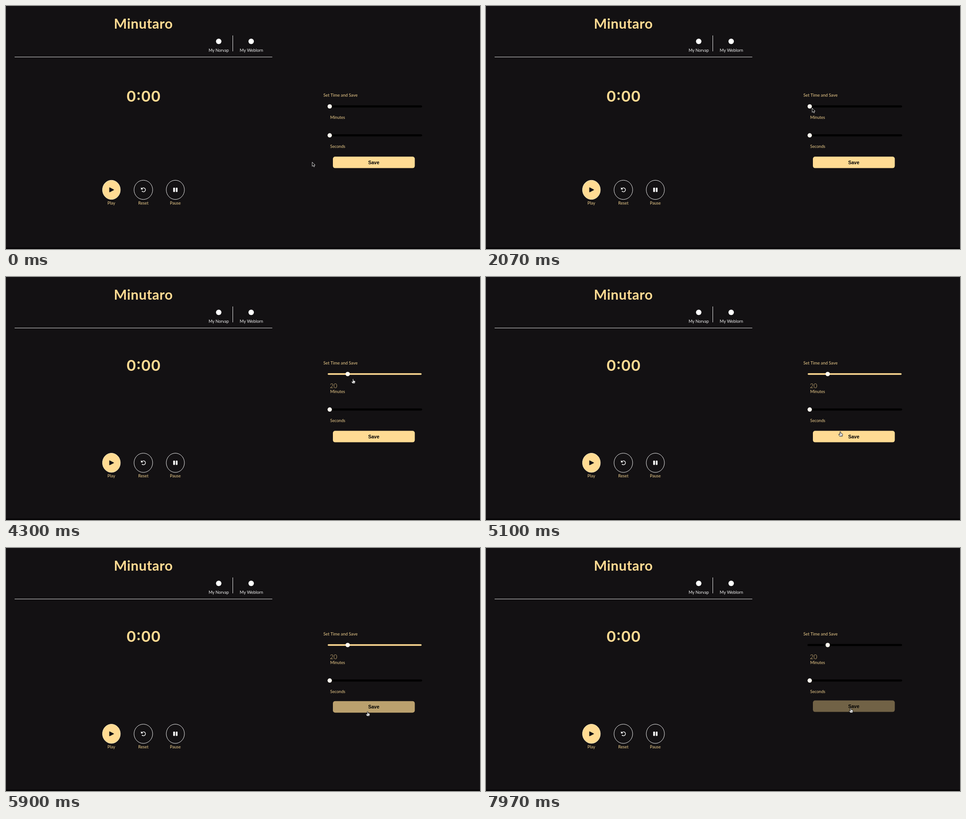
An HTML page with a canvas that plays this animation: 1044x536 px, repeating every 8000 ms.

```html
<!DOCTYPE html>
<html lang="en">
<head>
<meta charset="utf-8">
<title>Timer</title>
<style>
  html, body { margin: 0; width: 100%; height: 100%; overflow: hidden; background: #131113; }
  canvas { display: block; }
</style>
</head>
<body>
<canvas id="stage" width="1044" height="536"></canvas>
<script>
const ctx = document.getElementById('stage').getContext('2d');
const LOOP = 8000, BG = '#131113', GOLD = '#ffdb93', CREAM = '#fffaf0', LABEL = '#f0d08e';
const OPEN = 3430, BLUR = 7000;

// Each key is [time, ...values]; values ease from one key to the next.
const POINTER = [
  [1170, 674, 344], [1500, 748, 272], [1660, 756, 212], [1870, 717, 224],
  [2040, 717, 224], [2070, 718, 225], [2200, 716, 226], [2370, 716, 226],
  [2570, 714, 223], [2930, 714, 223], [3130, 714, 222], [3430, 714, 222],
  [3570, 734.5, 223], [4230, 764, 224], [4300, 764, 224], [5100, 780, 340.5],
  [5130, 780, 340.5], [5470, 719, 306], [5570, 722, 310], [5900, 796, 360],
  [5970, 796, 360], [6170, 803, 352.5]
];
const MINUTES = [[3430, 1], [3570, 5], [4180, 20]];
const HOVER = [[5755, 0], [6055, 1]];

function at(keys, t) {
  const next = keys.findIndex(k => k[0] > t);
  if (next === 0) return keys[0].slice(1);
  if (next < 0) return keys[keys.length - 1].slice(1);
  const a = keys[next - 1], b = keys[next];
  const u = (t - a[0]) / (b[0] - a[0]), s = u * u * (3 - 2 * u);
  return a.slice(1).map((v, i) => v + (b[i + 1] - v) * s);
}

function text(str, x, y, size, { color = LABEL, weight = 400, align = 'left', family = 'Lato, sans-serif', gap = 0 } = {}) {
  ctx.font = `${weight} ${size}px ${family}`;
  ctx.letterSpacing = gap + 'px';
  ctx.textAlign = align;
  ctx.fillStyle = color;
  ctx.fillText(str, x, y);
}

function bar(x, y, w, h, r, color) {
  ctx.fillStyle = color;
  ctx.beginPath();
  ctx.roundRect(x, y, w, h, r);
  ctx.fill();
}

function oval(x, y, rx, ry, fill, stroke) {
  ctx.beginPath();
  ctx.ellipse(x, y, rx, ry, 0, 0, Math.PI * 2);
  if (fill) { ctx.fillStyle = fill; ctx.fill(); }
  if (stroke) { ctx.strokeStyle = stroke; ctx.lineWidth = 1; ctx.stroke(); }
}

function header() {
  text('Minutaro', 302.5, 50, 30.5, { color: GOLD, weight: 700, align: 'center', gap: 0.5 });
  oval(468.5, 78, 6, 6, '#fff');
  oval(540, 78, 6, 6, '#fff');
  text('My Norvap', 468.5, 101, 9, { color: '#f2f2f2', align: 'center' });
  text('My Weblorn', 540.5, 101, 9.4, { color: '#f2f2f2', align: 'center' });
  bar(499, 65, 1, 35, 0, '#e8e8e8');
  bar(19, 112, 567.5, 1, 0, '#d8d8d8');
}

function controls(dy) {
  const y = 405.5 + dy;
  oval(232.2, y, 19.7, 21.2, GOLD, '#ffe9bd');
  oval(302.5, y, 20.5, 21.2, null, '#f0f0f0');
  oval(373, y, 20, 21.2, null, '#f0f0f0');

  ctx.fillStyle = ctx.strokeStyle = BG;
  ctx.lineWidth = 1.5;
  ctx.lineJoin = 'round';
  const play = new Path2D(`M228.2 ${y - 4.5}L237 ${y}L228.2 ${y + 4.5}Z`);
  ctx.fill(play);
  ctx.stroke(play);

  ctx.strokeStyle = '#fff';
  ctx.beginPath();
  ctx.arc(302.8, y, 4.3, -2.6, 2.5);
  ctx.stroke();
  ctx.fillStyle = '#fff';
  ctx.fill(new Path2D(`M297.3 ${y - 5.5}V${y - 0.7}H302Z`));

  for (const x of [368.3, 373.9]) bar(x, y - 4.8, 3.9, 9.6, 1, '#fff');
  [['Play', 232], ['Reset', 302.5], ['Pause', 373]].forEach(([s, x]) =>
    text(s, x, 437.5 + dy, 9.2, { align: 'center' }));
}

function slider(y, value, active) {
  if (active) bar(708.5, y - 1.8, 207, 3.6, 1.8, GOLD);
  else bar(708, y - 2.3, 208.5, 4.6, 2.3, '#000');
  oval(713 + value * 1.98, y, 4.8, 4.8, CREAM);
}

function saveButton(y, fade) {
  const style = { color: '#000', weight: 700, align: 'center', family: '"Liberation Sans", sans-serif' };
  bar(720, y, 180.4, 25.4, 5, BG);
  ctx.globalAlpha = 1 - 0.6 * fade;
  bar(720, y, 180.4, 25.4, 5, GOLD);
  ctx.globalAlpha = 1;
  text('Save', 810, y + 16.4, 10.6, style);
}

function panel(t, open) {
  const dy = open ? 7 : 0;
  const minutes = open ? Math.round(at(MINUTES, t)[0]) : 0;
  const [hover] = at(HOVER, t);
  text('Set Time and Save', 699, 199.5 - dy, 9.4);
  slider(open ? 214 : 221.5, minutes, open && t < BLUR);
  if (open) text(minutes, 713.5, 245, 13.6, { weight: 300, color: GOLD });
  text('Minutes', 714, 248.5 + dy, 9.1);
  slider(285.3 + dy, 0, false);
  text('Seconds', 714, 312.5 + dy, 9.1);
  saveButton(332.2 + dy - 3 * hover, hover);
}

const ARROW = new Path2D('M0 0V9.3L2.2 7.3L3.7 10.5L5.2 9.8L3.7 6.7H6.6Z');
const HAND = new Path2D('M-1 .8Q0-.6 1 .8V4L4 4.6Q5.2 5 5 6.5L4.3 10.5H-1.3L-3.6 6.8Q-3.8 5.2-2.3 5.8L-1 6.8Z');

function pointer(t) {
  const [x, y] = at(POINTER, t);
  const dragging = t >= 2930 && t < 4330;
  const overSave = t > 4330 && x >= 720 && y >= 338;
  const hand = dragging || overSave;
  const shape = hand ? HAND : ARROW;
  ctx.save();
  ctx.translate(x + 0.4, y + 0.4);
  ctx.fillStyle = hand ? '#fff' : '#000';
  ctx.strokeStyle = hand ? '#000' : '#e8e8e8';
  ctx.lineWidth = 0.9;
  ctx.lineJoin = 'round';
  ctx.fill(shape);
  ctx.stroke(shape);
  if (hand) {
    ctx.lineWidth = 0.5;
    ctx.stroke(new Path2D('M.3 7V9M1.8 7V9M3.2 7V9'));
  }
  ctx.restore();
}

function draw(now) {
  const t = now % LOOP, open = t >= OPEN;
  bar(0, 0, 1044, 536, 0, BG);
  bar(0, 533, 1044, 3, 0, '#050405');
  header();
  text('0:00', 302.8, open ? 207.3 : 210.8, 33, { color: GOLD, weight: 600, align: 'center', family: 'Inter, sans-serif' });
  controls(open ? 4.3 : 0);
  panel(t, open);
  pointer(t);
}

const start = performance.now();
function frame() {
  draw(performance.now() - start);
  requestAnimationFrame(frame);
}
frame();
</script>
</body>
</html>
```
